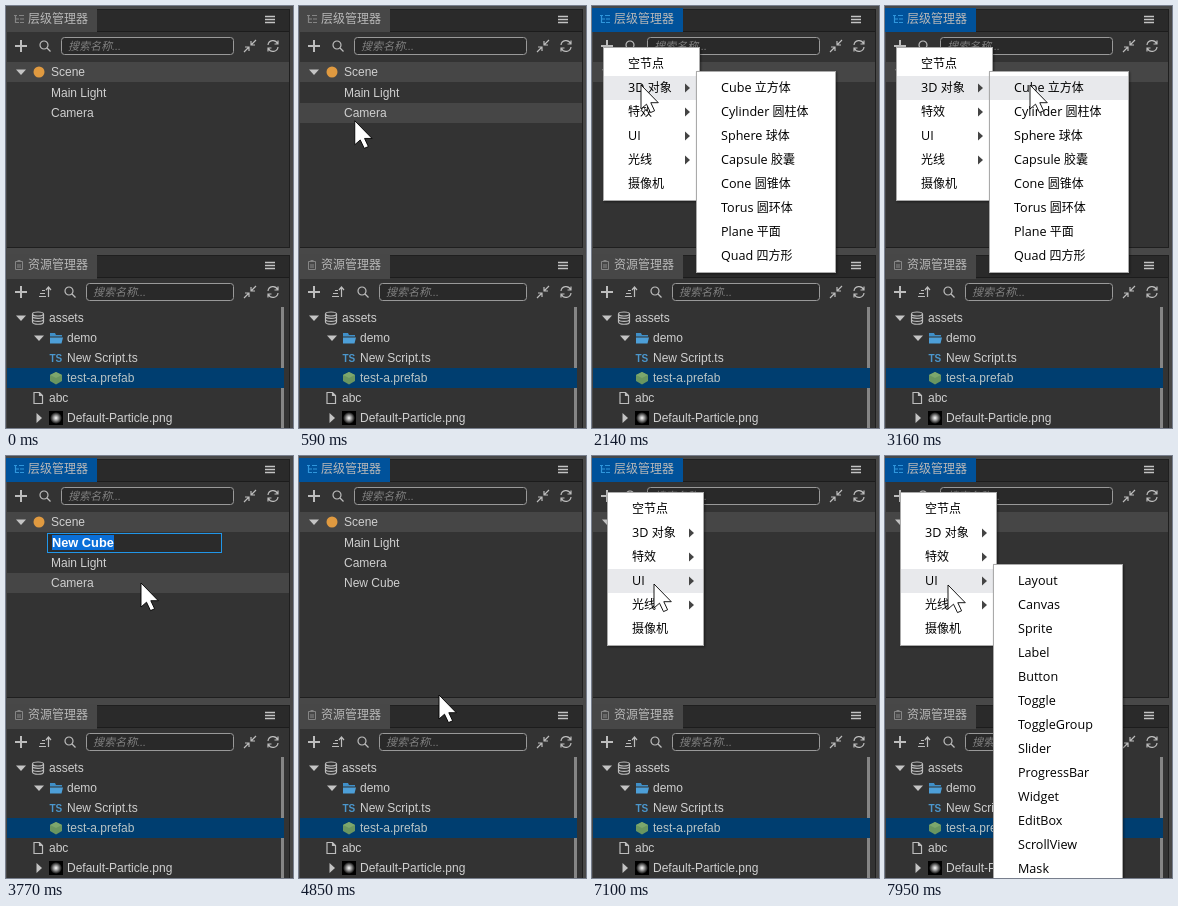
Recreate the animation shown at these times as an HTML page. Size 287 by 422 pixels, loop 8 s.

```html
<!DOCTYPE html>
<html lang="zh-CN">
<head>
<meta charset="utf-8">
<style>
html, body { margin: 0; width: 100%; height: 100%; overflow: hidden; background: #484848; }
svg { display: block; width: 287px; height: 422px; }
text { font: 12px "Liberation Sans", "Noto Sans CJK SC", "Noto Sans CJK", sans-serif; fill: #d0d0d0; white-space: pre; }
.tab { fill: #b8b8b8; }
.hint { font-size: 11px; font-style: italic; fill: #808080; }
.menu text { fill: #000; font-family: "Open Sans", "Noto Sans CJK SC", "Noto Sans CJK", sans-serif; }
.latin { font-size: 12.6px; }
.line { fill: none; stroke: #bdbdbd; stroke-width: 1.2; }
.menu { filter: drop-shadow(1px 1px 1px rgba(0, 0, 0, .45)); }
</style>
</head>
<body>
<svg id="stage" viewBox="0 0 287 422" lang="zh-CN"></svg>
<script>
const LOOP = 8000;
const stage = document.getElementById('stage');

const rect = (x, y, w, h, fill, extra = '') =>
  `<rect x="${x}" y="${y}" width="${w}" height="${h}" fill="${fill}" ${extra}/>`;
const path = (d, extra = 'class="line"') => `<path d="${d}" ${extra}/>`;
const at = (x, y, body) => `<g transform="translate(${x} ${y})">${body}</g>`;
const label = (x, midY, str, extra = '') => `<text x="${x}" y="${midY + 4}" ${extra}>${str}</text>`;
const solid = color => `fill="${color}"`;

const icons = {
  plus: path('M-6 0H6M0-6V6', 'fill="none" stroke="#bdbdbd" stroke-width="2"'),
  search: '<circle cx="-1" cy="-1" r="4" class="line"/>' + path('M2 2L5.5 5.5'),
  sort: path('M-6 4.5H1M-5 1.5H0M-3-1.5H0M3.5 5V-4M1-2L3.5-5L6-2'),
  collapse: path('M6-6L1-1M1-5V-1H5M-6 6L-1 1M-5 1H-1V5'),
  refresh: path('M-5-1A5 5 0 0 1 4.5-2.5M5-5.5V-2H1.5M5 1A5 5 0 0 1-4.5 2.5M-5 5.5V2H-1.5'),
  burger: path('M-5-3H5M-5 0H5M-5 3H5', 'stroke="#c4c4c4" stroke-width="1.3"'),
  open: path('M-5-2.5H5L0 3Z', solid('#c4c4c4')),
  closed: path('M-2.5-5V5L3 0Z', solid('#c4c4c4')),
  database: path('M-5.5-4V4C-5.5 7 5.5 7 5.5 4V-4M-5.5-1.5C-5.5 1 5.5 1 5.5-1.5M-5.5 1.5C-5.5 4 5.5 4 5.5 1.5') +
    '<ellipse cy="-4" rx="5.5" ry="2" class="line"/>',
  folder: path('M-6-5H-1L0-3H6V-1.5H-6Z', solid('#3f8fc8')) + path('M-6-.5H7L5.5 5.5H-6Z', solid('#4d9fd8')),
  file: path('M-4-5.5H1.5L4.5-2.5V5.5H-4ZM1.5-5.5V-2.5H4.5'),
  prefab: path('M0-6L6-3V3L0 6.5L-6 3V-3Z', solid('#6a9660')) + path('M0-6L6-3L0 0L-6-3Z', solid('#7da76c')),
  clip: path('M-3.5-3.5H3.5V4.5H-3.5ZM-1.5-4.5H1.5M-2 0H2M-2 2H2', 'fill="none" stroke="#858585"'),
};
const icon = (name, x, y) => at(x, y, icons[name]);

const treeIcon = color => at(13, 13,
  path('M-5-3.5H-2M-3.5-3V3.5H0M-3.5 0H0M0-3.5H5M1 0H5M1 3.5H5', `fill="none" stroke="${color}" stroke-width="1.2"`));

function panel(top, bottom, searchX) {
  const bar = top + 37;
  return rect(1, top, 283, bottom - top, '#1f1f1f') +
    rect(1, top + 1, 282, 22, '#2a2a2a') +
    rect(1, top + 23, 282, bottom - top - 24, '#333') +
    rect(91, top + 22, 192, 1, '#1c1c1c') +
    icon('burger', 264, top + 10.5) +
    icon('plus', 15, bar) +
    icon('search', searchX - 16, bar) +
    rect(searchX + .5, top + 28.5, 227 - searchX, 17, '#292929', 'rx="3" stroke="#999"') +
    label(searchX + 7, bar, '搜索名称...', 'class="hint"') +
    icon('collapse', 244, bar) + icon('refresh', 267, bar);
}

const background = rect(0, 0, 287, 422, '#484848') + panel(3, 242, 55) + panel(249, 430, 80) +
  rect(0, 248, 91, 25, '#474747') + icon('clip', 13, 259) + label(22, 259, '资源管理器', 'class="tab"') +
  icon('sort', 39, 286) +
  rect(275, 301, 3, 121, '#858585') + rect(1, 362, 277, 20, '#003e70') +
  icon('open', 15, 312) + icon('database', 32, 312) + label(43, 312, 'assets') +
  icon('open', 33, 332) + icon('folder', 50, 332) + label(61, 332, 'demo') +
  label(43.5, 352, 'TS', 'style="font-size:10px;font-weight:bold;fill:#4b97cd"') + label(61, 352, 'New Script.ts') +
  icon('prefab', 50, 372) + label(61, 372, 'test-a.prefab', 'style="fill:#b9c4c4"') +
  icon('file', 32, 392) + label(43, 392, 'abc') +
  icon('closed', 33, 412) + rect(43, 405, 14, 14, '#000') +
  '<circle cx="50" cy="412" r="6" fill="url(#glow)"/>' + label(61, 412, 'Default-Particle.png');

stage.innerHTML = `<defs><radialGradient id="glow"><stop stop-color="#fff"/><stop offset=".35" stop-color="#aaa"/>
  <stop offset="1" stop-color="#000"/></radialGradient></defs>${background}<g id="live"></g>`;
const live = document.getElementById('live');

// Start time, x, y, end time, x, y, number of steps
const moves = [
  [130, 190, 336, 740, 11, 41, 9],
  [1510, 16, 44, 1820, 49, 79, 5],
  [2440, 65, 80, 2750, 141, 80, 5],
  [2920, 143, 80, 2990, 145, 79, 2],
  [3690, 138, 100, 3930, 129, 181, 4],
  [4080, 130, 190, 4460, 150, 322, 6],
  [4540, 150, 310, 4850, 140, 239, 5],
  [4910, 130, 232, 5680, 15, 36, 11],
  [6410, 18, 44, 7100, 62, 128, 10],
  [7950, 63, 129, 7950, 63, 129, 1],
];

function pointer(t) {
  const move = moves.filter(m => t >= m[0]).pop();
  if (!move) return null;
  const [t0, x0, y0, t1, x1, y1, n] = move;
  const gaps = Math.max(1, n - 1);
  const p = t1 > t0 ? Math.min(gaps, Math.floor((t - t0) / (t1 - t0) * gaps + 1e-6)) / gaps : 1;
  return { x: x0 + (x1 - x0) * p, y: y0 + (y1 - y0) * p };
}

const mainItems = ['空节点', '3D 对象', '特效', 'UI', '光线', '摄像机'];
const shapeItems = ['Cube 立方体', 'Cylinder 圆柱体', 'Sphere 球体', 'Capsule 胶囊',
  'Cone 圆锥体', 'Torus 圆环体', 'Plane 平面', 'Quad 四方形'];
const uiItems = ['Layout', 'Canvas', 'Sprite', 'Label', 'Button', 'Toggle', 'ToggleGroup',
  'Slider', 'ProgressBar', 'Widget', 'EditBox', 'ScrollView', 'Mask', 'RichText'];
const menus = [
  { from: 1050, to: 3310, x: 11, y: 41, sub: { from: 2140, x: 104, y: 65, w: 140, items: shapeItems, parent: 1 } },
  { from: 6000, to: LOOP, x: 15, y: 36, sub: { from: 7420, x: 108, y: 108, w: 130, items: uiItems, parent: 3 } },
];

function menuBox(x, y, w, items, active, hasArrows) {
  const rows = items.map((item, i) => {
    const mid = 17 + 24 * i;
    const text = item.replace(/[\x20-\x7e]+/g, s => `<tspan class="latin">${s}</tspan>`);
    return (i === active ? rect(1, mid - 12, w - 2, 24, '#e8e9ec') : '') + label(25, mid, text) +
      (hasArrows && i > 0 && i < 5 ? path(`M82 ${mid - 4.5}V${mid + 4.5}L87 ${mid}Z`, solid('#444')) : '');
  }).join('');
  return `<g class="menu" transform="translate(${x} ${y})">` +
    rect(.5, .5, w - 1, items.length * 24 + 9, '#fff', 'stroke="#aaa"') + rows + '</g>';
}

const rowAt = (y, top) => Math.floor((y - top) / 24);

function drawMenu(menu, t, p) {
  const { sub } = menu;
  const subOpen = t >= sub.from;
  const active = subOpen ? sub.parent : rowAt(p.y, menu.y + 5);
  const subActive = p.x > sub.x ? rowAt(p.y, sub.y + 5) : -1;
  return menuBox(menu.x, menu.y, 97, mainItems, active, true) +
    (subOpen ? menuBox(sub.x, sub.y, sub.w, sub.items, subActive, false) : '');
}

function drawTree(t, p, menu) {
  const editing = t >= 3690 && t < 4080;
  const names = ['Main Light', 'Camera'];
  if (editing) names.unshift('New Cube');
  else if (t >= 4080) names.push('New Cube');

  const focused = t >= 970;
  let out = rect(0, 2, 91, 24, focused ? '#00529b' : '#474747') +
    treeIcon(focused ? '#2f96dc' : '#858585') + label(22, 13, '层级管理器', 'class="tab"') +
    rect(1, 56, 282, 20, '#464646');
  const hover = p ? Math.floor((p.y - 56) / 20) : -1;
  const settling = t >= 3310 && t < 3690;
  if (!menu && !settling && hover > 0 && hover <= names.length) out += rect(1, 57 + hover * 20, 282, 20, '#464646');

  out += icon('open', 15, 66) + '<circle cx="33" cy="66" r="5.5" fill="#e09a40"/>' + label(45, 66, 'Scene');
  names.forEach((name, i) => {
    const mid = 87 + i * 20;
    out += editing && i === 0
      ? rect(41.5, mid - 9.5, 174, 19, '#2b2b2b', 'stroke="#2196e8"') + rect(46, mid - 8, 62, 15, '#0a6fd8') +
        label(46, mid, name, 'style="font-size:12.8px;font-weight:bold;fill:#fff"')
      : label(45, mid, name);
  });
  return out;
}

const outline = 'fill="#fff" stroke="#000" stroke-width=".9" stroke-linejoin="round"';
const arrow = path('M0 0V24L5.5 19.2L9.5 27.6L13.6 25.8L9.8 17.7H17.3Z', outline);
const hand = '<g transform="translate(-4 0) scale(1.25)">' +
  path('M1.5 2C1.5-.5 5-.5 5 2V9C6 7.5 9 8 9 10C10 8.7 12.7 9.2 12.7 11C13.7 10 15.5 10.6 15.5 12.5V18' +
    'C15.5 21 13.5 22 13.5 25H3.5C3.5 22.5-2.5 18-3 14.5C-3.2 12.3-.5 12 1.5 15Z', outline) +
  path('M5 9V13M9 10V13.5M12.5 11.5V14', 'stroke="#000" stroke-width=".6"') + '</g>';

function drawPointer(p, menu) {
  const onButton = !menu && p.x < 24 && p.y > 30 && p.y < 50;
  return onButton
    ? rect(6, 31, 18, 18, '#262626', 'rx="2"') + icon('plus', 15, 40) + at(p.x, p.y, hand)
    : at(p.x, p.y, arrow);
}

let shown = '';
function render(t) {
  const p = pointer(t);
  const menu = menus.find(m => t >= m.from && t < m.to);
  const picture = drawTree(t, p, menu) + (menu ? drawMenu(menu, t, p) : '') + (p ? drawPointer(p, menu) : '');
  if (picture !== shown) live.innerHTML = shown = picture;
}

const start = performance.now();
function tick() {
  render((performance.now() - start) % LOOP);
  requestAnimationFrame(tick);
}
tick();
</script>
</body>
</html>
```
